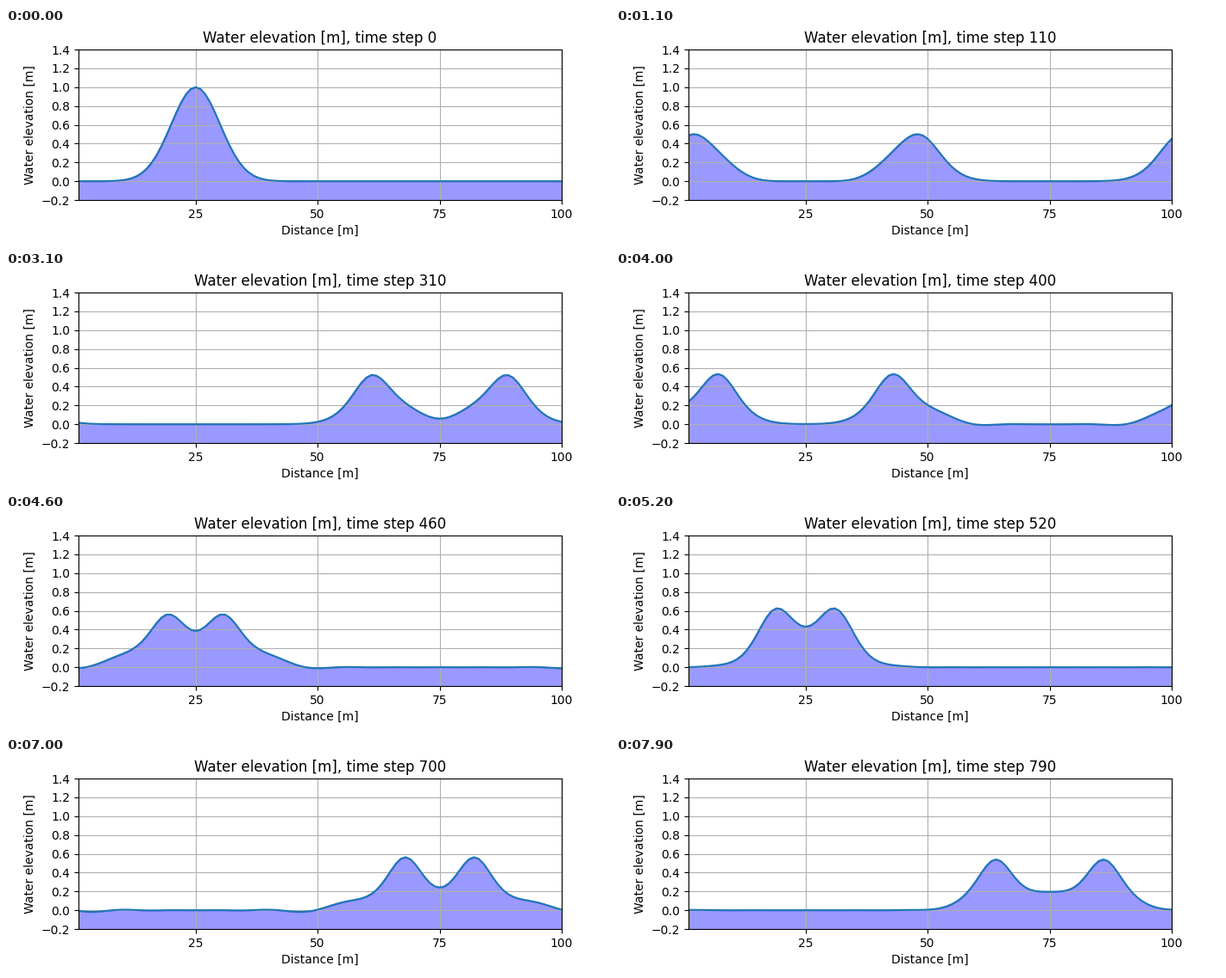
Recreate the animation shown at these times as a matplotlib script. Size 700x250 px, loop 8 s.

```python
import numpy as np
import matplotlib.pyplot as plt
from matplotlib.animation import FuncAnimation

# Grid, physics and time stepping
GRID_SIZE, DX, DT = 100, 1.0, 0.02
GRAVITY, MEAN_DEPTH = 9.8, 10.0
CENTER, DECAY = 25, 0.02
FRAMES, STEPS_PER_FRAME = 80, 10


def diff(f):
    """Centered difference on a periodic domain."""
    return 0.5 * (np.roll(f, -1) - np.roll(f, 1))


def simulate(x):
    """Solve the 1-d shallow water equations; one row per frame."""
    h = np.exp(-DECAY * (x - CENTER) ** 2)
    u = np.zeros_like(h)
    rows = [h]
    for step in range(1, (FRAMES - 1) * STEPS_PER_FRAME + 1):
        u = u - (u * diff(u) + GRAVITY * diff(h)) / DX * DT
        h = h - diff(u * (MEAN_DEPTH + h)) / DX * DT
        if step % STEPS_PER_FRAME == 0:
            rows.append(h)
    return rows


x = np.arange(1, GRID_SIZE + 1, dtype=float)
heights = simulate(x)

fig = plt.figure(figsize=(7, 2.5), dpi=100)
ax = fig.add_axes((0.12, 0.2, 0.8, 0.7))


def draw(frame):
    ax.clear()
    h = heights[frame]
    ax.fill_between(x, -0.5, h, color="b", alpha=0.4)
    ax.plot(x, h)
    ax.grid(True)
    ax.set_xlim(1, GRID_SIZE)
    ax.set_ylim(-0.2, 1.4)
    ax.set_xticks(range(25, 125, 25))
    ax.set_yticks(np.arange(-1, 8) / 5)
    ax.set_xlabel("Distance [m]")
    ax.set_ylabel("Water elevation [m]")
    ax.set_title(f"Water elevation [m], time step {frame * STEPS_PER_FRAME}")


anim = FuncAnimation(fig, draw, frames=FRAMES, interval=100,
                     repeat=True, repeat_delay=0)
plt.show()
```
